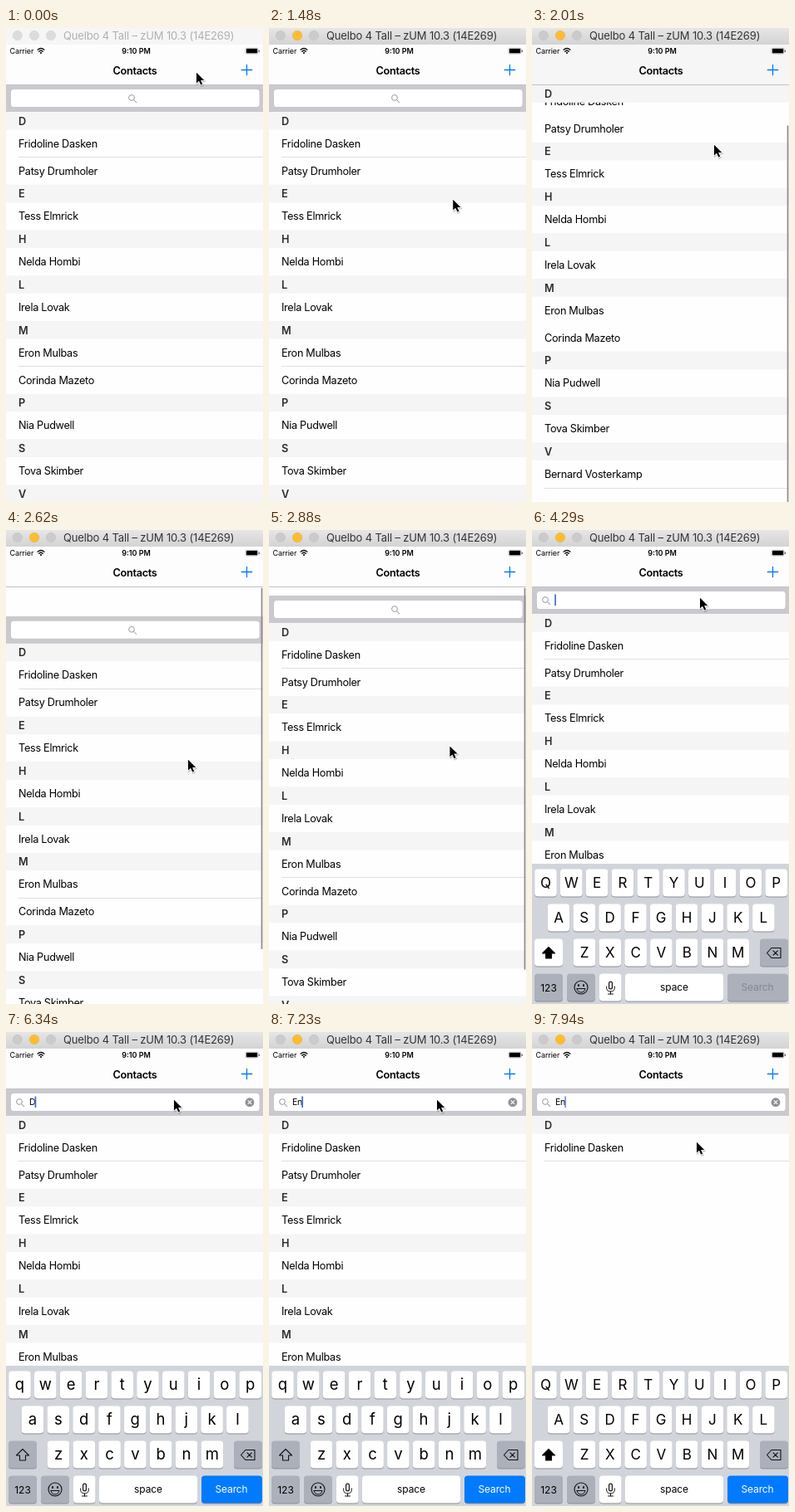
Recreate the animation shown at these times as an HTML page. Size 309 by 571 pixels, loop 8000 ms.

```html
<!DOCTYPE html>
<html lang="en">
<head>
<meta charset="utf-8">
<title>Contacts search</title>
<style>
  html, body { margin: 0; width: 100%; height: 100%; overflow: hidden; background: #fff; }
  svg { display: block; width: 309px; height: 571px; font-family: Inter, Roboto, sans-serif; }
  text { white-space: pre; }
  .crisp { shape-rendering: crispEdges; }
</style>
</head>
<body>
<script>
const LOOP = 8000, STEP = 88, MOVE_START = 1130;
const NAV_BOTTOM = 68.2, LIST_TOP = 101, HEADER = 21.6, ROW = 33.1, BOTTOM = 571;
const BLUE = '#007aff', KEY_GRAY = '#abb0bb';

const sections = [
  ['D', 'Fridoline Dasken', 'Patsy Drumholer'], ['E', 'Tess Elmrick'], ['H', 'Nelda Hombi'],
  ['L', 'Irela Lovak'], ['M', 'Eron Mulbas', 'Corinda Mazeto'], ['P', 'Nia Pudwell'],
  ['S', 'Tova Skimber'], ['V', 'Bernard Vosterkamp']
];

// time, value
const typed = [[0, ''], [4650, 'D'], [4740, 'Da'], [6340, 'D'], [6520, ''], [6690, 'E'], [7230, 'En']];
const caretAlpha = [[0, 0], [4290, 1], [5370, .5], [5460, 0], [5810, .5], [5900, 1], [7940, .75]];
const upperKeys = [[0, true], [4650, false], [6520, true], [6690, false], [7410, true]];
// time, x, y of the pointer tip
const pointerPath = [
  [1050, 229, 53], [1440, 222, 206], [1570, 219, 206], [1920, 219, 140], [2015, 219, 140],
  [2615, 219, 276], [2790, 219, 278], [3320, 202, 81], [7500, 202, 81], [7740, 207, 144], [7900, 198, 132]
];
const DRAG_FROM = 1500, DRAG_TO = 2710, SETTLED = 3260, GRAB_Y = 206;

const NS = 'http://www.w3.org/2000/svg';
function add(parent, tag, attrs = {}, content) {
  const node = document.createElementNS(NS, tag);
  set(node, attrs);
  if (content !== undefined) node.textContent = content;
  parent.appendChild(node);
  return node;
}
function set(node, attrs) {
  for (const name in attrs) node.setAttribute(name, attrs[name]);
}
const rect = (parent, x, y, width, height, fill, rx = 0) => add(parent, 'rect', { x, y, width, height, fill, rx });
const line = (parent, d, stroke, width = 1) =>
  add(parent, 'path', { d, stroke, 'stroke-width': width, fill: 'none', 'stroke-linecap': 'round', 'stroke-linejoin': 'round' });
const label = (parent, x, y, text, size, attrs = {}) =>
  add(parent, 'text', { x, y, 'font-size': size, 'letter-spacing': -.3, ...attrs }, text);
const separator = (parent, y) =>
  add(parent, 'rect', { x: 15, y, width: 294, height: 1, fill: '#dfdfe1', class: 'crisp' });
const centered = { 'text-anchor': 'middle' };
const show = (node, visible) => set(node, { visibility: visible ? 'visible' : 'hidden' });

const svg = add(document.body, 'svg', { viewBox: '0 0 309 571' });
const defs = add(svg, 'defs');
const chrome = add(defs, 'linearGradient', { id: 'chrome', x2: 0, y2: 1 });
add(chrome, 'stop', { 'stop-color': '#e6e6e6' });
add(chrome, 'stop', { offset: 1, 'stop-color': '#d3d3d3' });
rect(svg, 0, 0, 309, 571, '#fefefe');

// Scrolling content
const list = add(svg, 'g');
set(rect(list, 0, NAV_BOTTOM, 309, LIST_TOP - NAV_BOTTOM, '#c9c9ce'), { class: 'crisp' });
rect(list, 6, 74, 298.6, 21, '#fff', 3.6);
const lens = add(list, 'g');
add(lens, 'circle', { cx: -1, cy: -1, r: 3.4, fill: 'none', stroke: '#8e8e93', 'stroke-width': .9 });
line(lens, 'M1.6 1.6L4.8 4.8', '#8e8e93');
const input = label(list, 28, 88.3, '', 10.5, { 'letter-spacing': -.2 });
const caret = rect(list, 27, 77.5, 1.7, 13.5, '#4566d8');
const clear = add(list, 'g', { transform: 'translate(293 84.7)' });
add(clear, 'circle', { r: 5.4, fill: '#8e8e93' });
line(clear, 'M-2 -2L2 2M2 -2L-2 2', '#fff', 1.1);

const firstRow = add(list, 'g'), otherRows = add(list, 'g'), innerSeparators = [];
let y = LIST_TOP;
function addHeader(parent, top, letter) {
  const group = add(parent, 'g');
  rect(group, 0, top, 309, HEADER, '#f5f5f5');
  label(group, 15, top + 15.6, letter, 12.7, { 'font-weight': 600, fill: '#2b2b2b' });
  return group;
}
sections.forEach(([letter, ...names], s) => {
  if (s) addHeader(otherRows, y, letter);
  y += HEADER;
  names.forEach((name, i) => {
    const group = s || i ? otherRows : firstRow;
    label(group, 15, y + 21, name, 12.7);
    y += ROW;
    if (i < names.length - 1) innerSeparators.push(separator(group, Math.floor(y)));
  });
});
const contentEnd = y, maxScroll = contentEnd - BOTTOM;
separator(otherRows, contentEnd);
const stickyHeader = addHeader(svg, LIST_TOP, 'D');
const scrollbar = rect(svg, 306.7, 0, 1.7, 10, '#8c8c8e', .8);

// Navigation and status bar
const nav = rect(svg, 0, 20, 309, 48, '#fdfdfd');
rect(svg, 0, 68, 309, 1, '#c3c3c5');
label(svg, 155, 56, 'Contacts', 12.7, { ...centered, 'font-weight': 600 });
line(svg, 'M283.3 50.5H295.7M289.5 44.3V56.7', BLUE, 1.3);
label(svg, 4.5, 31, 'Carrier', 9, { 'letter-spacing': -.1 });
line(svg, 'M38 26.2Q42 22.8 46 26.2M39.7 28.2Q42 26.2 44.3 28.2', '#111', 1.3);
add(svg, 'circle', { cx: 42, cy: 30, r: 1.1 });
label(svg, 156.5, 31, '9:10 PM', 9, { ...centered, 'font-weight': 600, 'letter-spacing': 0 });
set(rect(svg, 288.2, 24.3, 14.8, 6.6, 'none', 1.4), { stroke: '#777', 'stroke-width': .6 });
rect(svg, 289, 25, 13.2, 5.2, '#000', .8);
rect(svg, 303.8, 26.4, 1, 2.5, '#444', .5);

// Window bar
const bar = rect(svg, 0, 0, 309, 20, '#f6f6f6');
const lights = [13.8, 34, 54].map(cx =>
  add(svg, 'circle', { cx, cy: 9, r: 5.7, 'stroke-width': .5 }));
const title = label(svg, 69, 14, 'Quelbo 4 Tall – zUM 10.3 (14E269)', 13, { 'letter-spacing': -.15 });

// Keyboard
const keyboard = add(svg, 'g');
rect(keyboard, 0, 402, 309, 169, '#d1d5db');
function addKey(x, y, width, fill = '#fff') {
  rect(keyboard, x, y + 1, width, 33, '#8b8e94', 4);
  return rect(keyboard, x, y, width, 33, fill, 4);
}
const letters = [];
[['QWERTYUIOP', 16.5, 408.5], ['ASDFGHJKL', 32, 450.5], ['ZXCVBNM', 63, 492.5]].forEach(([row, x0, top]) =>
  [...row].forEach((char, i) => {
    const x = x0 + 30.8 * i;
    addKey(x - 13.3, top, 26.6);
    letters.push([char, label(keyboard, x, top + 22.8, char, 17, { ...centered, 'letter-spacing': 0 })]);
  }));
const shiftKey = addKey(3, 492.5, 34);
const shiftArrow = line(keyboard, 'M20 502.5L27.5 510H23.5V516H16.5V510H12.5Z', '#111', 1.1);
addKey(274, 492.5, 34, KEY_GRAY);
line(keyboard, 'M282.5 509.5L288 503.5H299V515.5H288ZM290 506.8L295.4 512.2M295.4 506.8L290 512.2', '#111', 1.1);
addKey(3, 534.5, 34, KEY_GRAY);
label(keyboard, 20, 555.5, '123', 12, { ...centered, 'letter-spacing': 0 });
addKey(42, 534.5, 34, KEY_GRAY);
add(keyboard, 'circle', { cx: 59, cy: 551, r: 8, fill: 'none', stroke: '#111', 'stroke-width': 1.1 });
[56, 62].forEach(cx => add(keyboard, 'ellipse', { cx, cy: 548.5, rx: 1, ry: 1.5 }));
line(keyboard, 'M54 552.5H64Q63 557 59 557T54 552.5', '#111', 1);
addKey(81, 534.5, 26.6);
rect(keyboard, 92, 543.5, 5, 10, '#111', 2.5);
rect(keyboard, 93.2, 544.7, 2.6, 7.6, '#fff', 1.3);
line(keyboard, 'M89.6 550V551.5Q90 556 94.5 556T99.4 551.5V550M94.5 556V559M91.5 559H97.5', '#111', 1);
addKey(112, 534.5, 118);
label(keyboard, 171, 555, 'space', 12, { ...centered, 'letter-spacing': -.1 });
const searchKey = addKey(235, 534.5, 73);
const searchText = label(keyboard, 271, 555, 'Search', 12, { ...centered, 'letter-spacing': -.1 });

// Pointer: soft shadow, white rim, black body
const pointer = add(svg, 'g');
const arrow = 'M0 .8V13.6L3 10.8L5.2 15.6L7.2 14.7L5.1 10H9.2Z';
set(line(pointer, arrow, '#000', 2), { transform: 'translate(.6 1.2)', opacity: .22 });
set(line(pointer, arrow, '#fff', 1.6), { fill: '#fff' });
add(pointer, 'path', { d: arrow });

// Timing
const at = (table, t) => table.filter(([time]) => time <= t).pop()[1];
const snap = t => Math.max(0, MOVE_START + STEP * Math.floor((t - MOVE_START) / STEP + .12));
const clamp = v => Math.min(1, Math.max(0, v));
const smooth = p => p * p * (3 - 2 * p);
function pointerAt(t) {
  const next = pointerPath.findIndex(([time]) => time > t);
  if (next === 0) return pointerPath[0].slice(1);
  if (next < 0) return pointerPath[pointerPath.length - 1].slice(1);
  const [t0, x0, y0] = pointerPath[next - 1], [t1, x1, y1] = pointerPath[next];
  const p = smooth((t - t0) / (t1 - t0));
  return [x0 + (x1 - x0) * p, y0 + (y1 - y0) * p];
}
function rubber(distance) {
  const height = BOTTOM - NAV_BOTTOM;
  return height * (1 - 1 / (distance * .55 / height + 1));
}
function scrollAt(t) {
  if (t < DRAG_FROM || t >= SETTLED) return 0;
  const raw = GRAB_Y - pointerAt(Math.min(t, DRAG_TO))[1];
  const offset = raw < 0 ? -rubber(-raw) : raw > maxScroll ? maxScroll + rubber(raw - maxScroll) : raw;
  return offset * (1 - clamp((t - DRAG_TO) / (SETTLED - DRAG_TO))) ** 3;
}

function drawWindow(active) {
  set(bar, { fill: active ? 'url(#chrome)' : '#f6f6f6' });
  set(title, { fill: active ? '#333' : '#b0b0b0' });
  lights.forEach((light, i) => {
    const yellow = active && i === 1;
    set(light, {
      fill: yellow ? '#fdbd2f' : active ? '#cbcbcb' : '#dcdcdc',
      stroke: yellow ? '#e6a932' : active ? '#bebebe' : '#d0d0d0'
    });
  });
}

function drawScroll(t, offset) {
  set(list, { transform: `translate(0 ${-offset})` });
  set(stickyHeader, { transform: `translate(0 ${Math.max(-offset, NAV_BOTTOM - LIST_TOP)})` });
  set(nav, { fill: offset > 15 ? '#f6f6f6' : '#fdfdfd' });
  innerSeparators.forEach(node => set(node, { opacity: offset > 0 ? 0 : 1 }));
  const view = BOTTOM - NAV_BOTTOM, ratio = view / (view + maxScroll);
  const over = Math.max(0, -offset, offset - maxScroll);
  set(scrollbar, {
    y: NAV_BOTTOM + 1.5 + Math.max(0, offset) * ratio,
    height: view * ratio - over,
    opacity: t < DRAG_FROM ? 0 : clamp((3400 - t) / 200)
  });
}

function drawSearch(t, text, progress) {
  set(lens, { transform: `translate(${152 - 135 * progress} 85)` });
  if (input.textContent !== text) input.textContent = text;
  set(caret, { x: 27.2 + (text ? input.getComputedTextLength() : 0), opacity: at(caretAlpha, t) });
  show(clear, text);
  show(otherRows, t < 7320);
}

function drawKeyboard(t, text, progress) {
  const upper = at(upperKeys, t);
  set(keyboard, { transform: `translate(0 ${170 * (1 - progress)})` });
  show(keyboard, progress > 0);
  letters.forEach(([char, node]) => {
    const shown = upper ? char : char.toLowerCase();
    if (node.textContent === shown) return;
    node.textContent = shown;
    set(node, { 'font-size': upper ? 17 : 18.5 });
  });
  set(shiftKey, { fill: upper ? '#fff' : KEY_GRAY });
  set(shiftArrow, { fill: upper ? '#000' : 'none' });
  set(searchKey, { fill: text ? BLUE : KEY_GRAY });
  set(searchText, { fill: text ? '#fff' : '#838892' });
}

function render(t) {
  const moving = snap(t), text = at(typed, t);
  const progress = 1 - (1 - clamp((moving - 3946) / 350)) ** 2;
  const risen = t < 4000 ? 0 : progress;
  drawWindow(t >= 780);
  drawScroll(moving, scrollAt(moving));
  drawSearch(t, text, risen);
  drawKeyboard(t, text, risen);
  set(pointer, { transform: `translate(${pointerAt(moving)})` });
}

const start = performance.now();
function tick() {
  render((performance.now() - start) % LOOP);
  requestAnimationFrame(tick);
}
tick();
</script>
</body>
</html>
```
